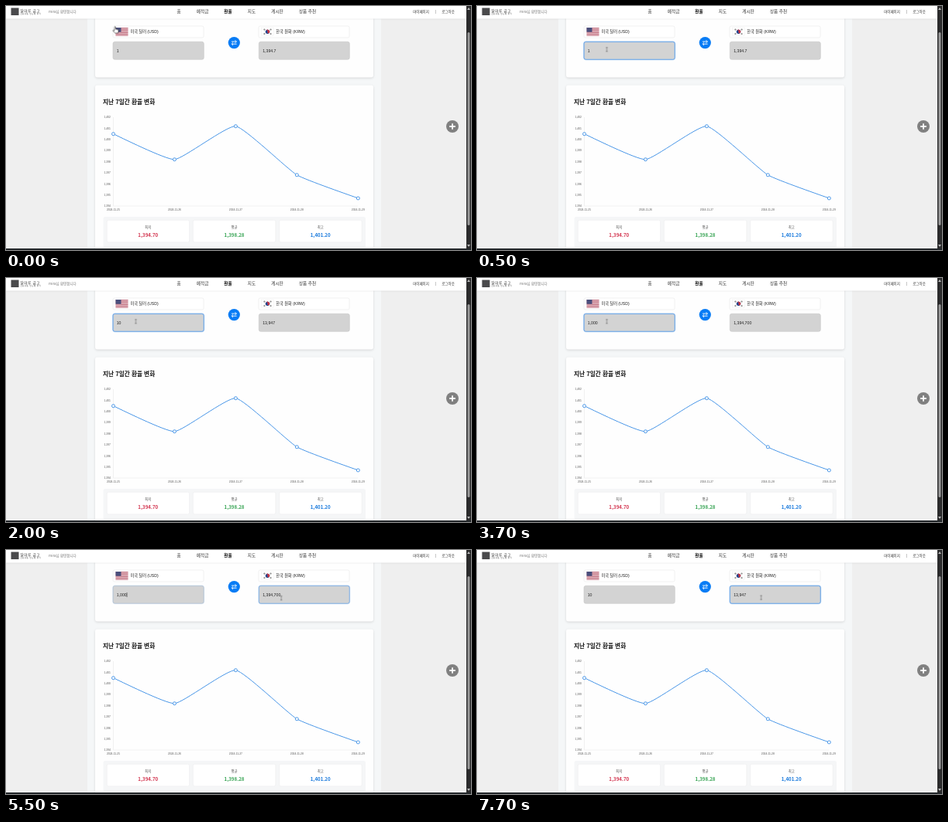
Animation, 600 px wide and 316 px high, one loop 8000 ms. Source, as an HTML page:

```html
<!DOCTYPE html>
<html lang="ko">
<head>
<meta charset="utf-8">
<title>환율 계산기</title>
<style>
  html, body { margin: 0; width: 100%; height: 100%; overflow: hidden; background: #efefef; }
  svg { display: block; width: 600px; height: 316px; }
  text { font-family: "Noto Sans CJK KR", "Noto Sans CJK", sans-serif; fill: #333; }
  .nav text { font-size: 5.6px; text-anchor: middle; }
  .nav .user { font-size: 4.5px; }
  .nav .left { text-anchor: start; }
  .form text { font: 5.2px "Liberation Sans", "Noto Sans CJK KR", sans-serif; fill: #222; }
  .axis text { font: 3.4px "Liberation Sans", sans-serif; fill: #555; }
  .axis .y { text-anchor: end; }
  .axis .x, .stats text { text-anchor: middle; }
  .stats .label { font-size: 4.4px; fill: #555; }
  .stats .value { font-size: 6.2px; font-weight: 700; }
  .card { fill: #fefefe; filter: drop-shadow(0 1px 1.5px #0002); }
  .focus rect { fill: none; stroke: #5c9de6; stroke-width: .8; }
  .focus .glow { stroke: #9cc8f8; stroke-width: 1.8; opacity: .45; }
  .caret { stroke: #222; stroke-width: .6; }

  /* Everything dynamic switches hard on one shared 8 s clock. */
  .anim { opacity: 0; animation: 8s step-end infinite; }
  .v1 { animation-name: v1; }
  .v10 { animation-name: v10; }
  .v100 { animation-name: v100; }
  .v1000 { animation-name: v1000; }
  .focus-usd { animation-name: focus-usd; }
  .focus-krw { animation-name: focus-krw; }
  .caret-usd { animation-name: caret-usd; }
  .caret-krw { animation-name: caret-krw; }
  .hand { animation-name: hand; }
  .arrow { animation-name: arrow; }
  .beam { animation-name: beam; }

  @keyframes v1 { 0% { opacity: 1 } 23.75%, 100% { opacity: 0 } }
  @keyframes v10 { 0%, 36.25% { opacity: 0 } 23.75%, 95%, 100% { opacity: 1 } }
  @keyframes v100 { 0%, 46.25%, 95%, 100% { opacity: 0 } 36.25%, 85% { opacity: 1 } }
  @keyframes v1000 { 0%, 85%, 100% { opacity: 0 } 46.25% { opacity: 1 } }
  @keyframes focus-usd {
    0%, 70%, 100% { opacity: 0 }
    5% { opacity: .5 }
    6.25% { opacity: 1 }
    68.75% { opacity: .25 }
  }
  @keyframes focus-krw { 0% { opacity: 0 } 68.75% { opacity: .75 } 70%, 100% { opacity: 1 } }
  @keyframes caret-usd { 0%, 70%, 100% { opacity: 0 } 62.5% { opacity: 1 } }
  @keyframes caret-krw { 0%, 72.5%, 100% { opacity: 0 } 70% { opacity: 1 } }
  @keyframes hand {
    0% { opacity: 1; transform: translate(140px, 26.5px) }
    1.25% { opacity: 1; transform: translate(150px, 34px) }
    2.5%, 100% { opacity: 0 }
  }
  @keyframes arrow {
    0% { opacity: 0 }
    2.5% { opacity: 1; transform: translate(162px, 43px) }
    3.75% { opacity: 1; transform: translate(168.6px, 46.8px) }
    5%, 100% { opacity: 0 }
  }
  @keyframes beam {
    0% { opacity: 0 }
    5% { opacity: 1; transform: translate(168px, 55px) }
    6.25% { opacity: 1; transform: translate(167.5px, 56.3px) }
    62.5% { opacity: 0; transform: translate(167.5px, 56.3px) }
    68.75% { opacity: 1; transform: translate(355.2px, 62.2px) }
    70%, 100% { opacity: 1; transform: translate(366.6px, 61.6px) }
  }
</style>
</head>
<body>
<svg viewBox="0 0 600 316">
  <rect width="600" height="316" fill="#efefef"/>
  <rect x="105" width="379" height="316" fill="#f5f7f8"/>
  <rect class="card" x="115" y="-10" width="359" height="102.5" rx="3"/>
  <rect class="card" x="115" y="102.5" width="359" height="230" rx="3"/>

  <g class="form">
    <g fill="#fff" stroke="#e8e8e8" stroke-width=".6">
      <rect x="138" y="26" width="117" height="15" rx="2"/>
      <rect x="326" y="26" width="117" height="15" rx="2"/>
    </g>
    <g fill="#d3d3d3" stroke="#c6c6c6" stroke-width=".6">
      <rect x="138" y="46.3" width="117.3" height="23" rx="2.5"/>
      <rect x="326.3" y="46.3" width="117" height="23" rx="2.5"/>
    </g>

    <rect x="141.5" y="28" width="16" height="10.6" fill="#ecd5d9"/>
    <path d="M149.5 28v10.6" stroke="#b8566a" stroke-width="16" stroke-dasharray=".815"/>
    <rect x="141.5" y="28" width="7" height="5.7" fill="#4a4f7c"/>

    <rect x="329.5" y="28" width="16" height="10.6" fill="#fff" stroke="#e9e9e9" stroke-width=".4"/>
    <g transform="translate(337.5 33.3)">
      <g transform="rotate(28)">
        <circle r="2.7" fill="#24478f"/>
        <path d="M-2.7 0A2.7 2.7 0 0 1 2.7 0A1.35 1.35 0 0 1 0 0A1.35 1.35 0 0 0 -2.7 0" fill="#cd3340"/>
      </g>
      <g stroke="#444" stroke-width="1.9" stroke-dasharray=".4 .3">
        <path d="M-5.8 0h1.8M4 0h1.8" transform="rotate(34)"/>
        <path d="M-5.8 0h1.8M4 0h1.8" transform="rotate(-34)"/>
      </g>
    </g>
    <text x="160.4" y="35.2">미국 달러 (USD)</text>
    <text x="348.3" y="35.2">한국 원화 (KRW)</text>

    <circle cx="294.3" cy="47.6" r="7.6" fill="#087cf5"/>
    <g fill="none" stroke="#fff" stroke-width=".9">
      <path d="M291 46.1h6.4m-1.8-1.8l1.8 1.8l-1.8 1.8"/>
      <path d="M297.6 49.2h-6.4m1.8-1.8l-1.8 1.8l1.8 1.8"/>
    </g>

    <g class="anim focus focus-usd">
      <rect class="glow" x="138" y="46.3" width="117.3" height="23" rx="2.5"/>
      <rect x="138" y="46.3" width="117.3" height="23" rx="2.5"/>
    </g>
    <g class="anim focus focus-krw">
      <rect class="glow" x="326.3" y="46.3" width="117" height="23" rx="2.5"/>
      <rect x="326.3" y="46.3" width="117" height="23" rx="2.5"/>
    </g>

    <g class="anim v1"><text x="142.7" y="59.6">1</text><text x="331.2" y="59.6">1,394.7</text></g>
    <g class="anim v10"><text x="142.7" y="59.6">10</text><text x="331.2" y="59.6">13,947</text></g>
    <g class="anim v100"><text x="142.7" y="59.6">100</text><text x="331.2" y="59.6">139,470</text></g>
    <g class="anim v1000"><text x="142.7" y="59.6">1,000</text><text x="331.2" y="59.6">1,394,700</text></g>
    <path class="anim caret caret-usd" d="M156 55v6"/>
    <path class="anim caret caret-krw" d="M354.5 55v6"/>
  </g>

  <text x="125" y="127.2" font-size="7.65" font-weight="700" style="fill:#111">지난 7일간 환율 변화</text>

  <g class="axis" id="axis">
    <path d="M138.5 144V259H454.3" fill="none" stroke="#e4e4e4" stroke-width=".5"/>
  </g>
  <g id="plot" stroke="#4a97e8" stroke-width="1"/>

  <g class="stats">
    <rect x="125.5" y="273" width="338.5" height="40" rx="2.5" fill="#f5f6f7"/>
    <g fill="#fff" stroke="#ededee" stroke-width=".6">
      <rect x="130.2" y="277.3" width="106.4" height="28.6" rx="2"/>
      <rect x="241.4" y="277.3" width="106.4" height="28.6" rx="2"/>
      <rect x="352.7" y="277.3" width="106.4" height="28.6" rx="2"/>
    </g>
    <text class="label" x="183.3" y="288">최저</text>
    <text class="label" x="294.5" y="288">평균</text>
    <text class="label" x="405.7" y="288">최고</text>
    <text class="value" x="183.3" y="299" style="fill:#d2314c">1,394.70</text>
    <text class="value" x="294.5" y="299" style="fill:#35a352">1,398.28</text>
    <text class="value" x="405.7" y="299" style="fill:#1678dc">1,401.20</text>
  </g>

  <g class="nav">
    <rect width="594" height="16.5" fill="#fff" style="filter:drop-shadow(0 .6px .8px #0002)"/>
    <rect x="6.5" y="2.5" width="10" height="9.5" fill="#4a4a4c"/>
    <text class="left" x="18.6" y="7.7" style="font-size:4.6px;letter-spacing:.5px">달마루 금고</text>
    <text class="left" x="18.4" y="11.2" style="font-size:2.3px;letter-spacing:.6px">금융상품 한눈에 보기</text>
    <text class="left user" x="55" y="9.4" style="fill:#777">mira님 환영합니다</text>
    <text x="223" y="9.4">홈</text>
    <text x="253.6" y="9.4">예적금</text>
    <text x="286.5" y="9.4" font-weight="700" style="fill:#000">환율</text>
    <text x="317" y="9.4">지도</text>
    <text x="350" y="9.4">게시판</text>
    <text x="389" y="9.4">상품 추천</text>
    <text class="user" x="535.5" y="9.3">마이페이지</text>
    <text class="user" x="554" y="9.3">|</text>
    <text class="user" x="570.5" y="9.3">로그아웃</text>
  </g>

  <circle cx="576" cy="156" r="8" fill="#808080"/>
  <path d="M576 152.2v7.6m-3.8-3.8h7.6" stroke="#fff" stroke-width="1.8"/>

  <rect x="594" width="6" height="316" fill="#2b2b2c"/>
  <rect x="595.5" y="34" width="3" height="250" rx="1.5" fill="#9b9b9b"/>
  <path d="M595 5l2-3l2 3zM595 309l2 3l2-3z" fill="#bbb"/>
  <rect y="314" width="600" height="2" fill="#25292c"/>

  <g class="anim hand">
    <path d="M0 .7q.8-1 1.5 0V3.4l3.1.8q.7.3.6 1L4.6 8.6H.7L-2 5.6q0-1 1-.8l1 .6z" fill="#fff" stroke="#222" stroke-width=".6"/>
  </g>
  <g class="anim arrow">
    <path d="M0 0V5.4L1.3 4.3L2.2 6.2L3 5.8L2.1 4L3.8 3.8z" fill="#fff" stroke="#222" stroke-width=".5"/>
  </g>
  <g class="anim beam">
    <path d="M-1.2-2.6h2.4M0-2.6v5.2M-1.2 2.6h2.4" fill="none" stroke="#444" stroke-width=".5"/>
  </g>
</svg>
<script>
  const axis = document.getElementById('axis');
  const plot = document.getElementById('plot');
  const rates = [1400.5, 1398.2, 1401.2, 1396.8, 1394.7];
  const rateY = rate => 144.2 + (1402 - rate) * 14.35;
  const points = rates.map((rate, i) => [138.5 + i * 78.95, rateY(rate)]);

  function add(parent, tag, attrs, label = '') {
    const node = document.createElementNS(parent.namespaceURI, tag);
    for (const key in attrs) node.setAttribute(key, attrs[key]);
    node.textContent = label;
    parent.append(node);
  }

  // Control point beside point i, along the chord between its neighbours.
  function handle(i, reach) {
    const prev = points[i - 1] || points[i];
    const next = points[i + 1] || points[i];
    return points[i].map((v, k) => v + reach * (next[k] - prev[k]));
  }

  for (let rate = 1394; rate <= 1402; rate++) {
    add(axis, 'text', { class: 'y', x: 135, y: rateY(rate) + 1.2 }, rate.toLocaleString('en-US'));
  }
  const reach = 0.07;
  const curve = points.slice(1).map((p, i) => `C${handle(i, reach)} ${handle(i + 1, -reach)} ${p}`);
  add(plot, 'path', { fill: 'none', d: `M${points[0]}${curve.join('')}` });
  points.forEach(([x, y], i) => {
    add(axis, 'text', { class: 'x', x, y: 265.4 }, `2024-11-${25 + i}`);
    add(plot, 'circle', { cx: x, cy: y, r: 2, fill: '#fff' });
  });
</script>
</body>
</html>
```
